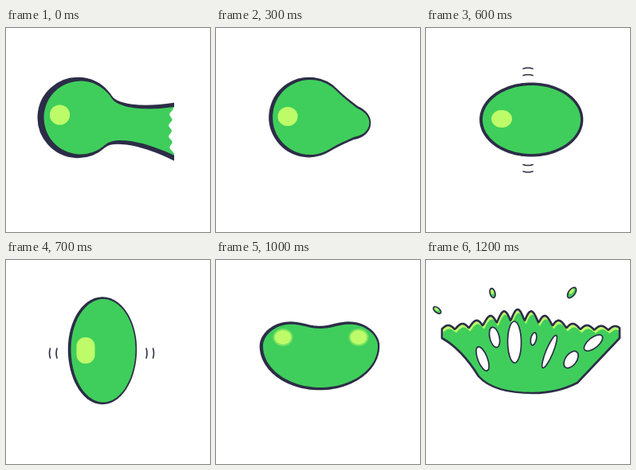
Animation of 256 by 256 pixels, one loop 1.3 s. Source, as an HTML page with a canvas:

```html
<!DOCTYPE html>
<html lang="en">
<head>
<meta charset="utf-8">
<title>Slime bounce</title>
<style>
html, body { margin: 0; width: 100%; height: 100%; overflow: hidden; background: #fff; }
canvas { display: block; width: 256px; height: 256px; }
</style>
</head>
<body>
<canvas id="stage"></canvas>
<script>
const INK = '#2c2d47', GREEN = '#3fce5b', LIME = '#bdfb69', WHITE = '#fff';
const STEP = 100, TAU = Math.PI * 2;
const canvas = document.getElementById('stage');
const ctx = canvas.getContext('2d');
const ratio = window.devicePixelRatio || 1;
canvas.width = canvas.height = 256 * ratio;
ctx.scale(ratio, ratio);
ctx.lineCap = ctx.lineJoin = 'round';

function fill(path, color) {
  ctx.fillStyle = color;
  ctx.fill(path);
}

function line(path, width) {
  ctx.strokeStyle = INK;
  ctx.lineWidth = width;
  ctx.stroke(path);
}

function oval(x, y, rx, ry, turn = 0) {
  const path = new Path2D();
  path.ellipse(x, y, rx, ry, turn, 0, TAU);
  return path;
}

// Oval with separate upper and lower radii and a soft dent in its top
function bean(cx, cy, rx, up, down, dent = 0) {
  const path = new Path2D();
  for (let a = 0; a < TAU; a += TAU / 120) {
    const x = rx * Math.cos(a), s = Math.sin(a);
    const y = s > 0 ? s * down : s * up + dent * Math.exp(-((x / 35) ** 2)) * Math.min(1, -3 * s);
    path.lineTo(cx + x, cy + y);
  }
  path.closePath();
  return path;
}

// Ball drawn out along a tilted axis: waist and end are [distance, half width]
function drop(cx, cy, r, open, tilt, waist, end) {
  const half = new Path2D(), c = Math.cos(open), s = Math.sin(open);
  const [wx, wy] = waist, [ex, ey] = end, pull = 14, cap = ex + 1.25 * ey;
  half.arc(0, 0, r, open, TAU - open);
  half.bezierCurveTo(r * c + pull * s, -r * s + pull * c, wx, -wy, ex, -ey);
  half.bezierCurveTo(cap, -0.65 * ey, cap, 0.65 * ey, ex, ey);
  half.bezierCurveTo(wx, wy, r * c + pull * s, r * s - pull * c, r * c, r * s);
  const path = new Path2D();
  path.addPath(half, new DOMMatrix().translate(cx, cy).rotate(tilt * 360 / TAU));
  return path;
}

// Green body; shifting the ink makes the outline heavier on the left
function body(path, ink, shift) {
  ctx.save();
  ctx.translate(-shift, 0);
  fill(path, INK);
  line(path, ink * 2);
  ctx.restore();
  fill(path, GREEN);
}

function shine(...args) { fill(oval(...args), LIME); }

function softShine(x, y) {
  ctx.globalAlpha = 0.45;
  shine(x, y, 12.5, 11);
  ctx.globalAlpha = 1;
  shine(x, y, 10.5, 9);
}

// Two short strokes on either side, along the given direction
function marks(cx, cy, turn) {
  ctx.save();
  ctx.translate(cx, cy);
  ctx.rotate(turn);
  for (const d of [-64.5, -56, 56, 64.5]) {
    const path = new Path2D();
    path.moveTo(-6, d);
    path.quadraticCurveTo(0, d + 2 * Math.sign(d), 6, d);
    line(path, 1.6);
  }
  ctx.restore();
}

function torn() {
  ctx.save();
  ctx.beginPath();
  ctx.rect(0, 0, 211, 256);
  ctx.clip();
  body(drop(93.5, 112.5, 46, 0.7, 0.133, [76, 16], [128, 33]), 4.7, 3.3);
  const tear = new Path2D('M230 160V100');
  for (let y = 100; y <= 157; y++) tear.lineTo(208 + 2 * Math.sin(y * 0.45) - 2 * Math.sin((y - 100) / 18), y);
  fill(tear, WHITE);
  ctx.restore();
  shine(67.5, 109, 12.6, 12.6);
}

function tail() {
  body(drop(101, 112, 46, 0.7, 0.1, [82, 12], [117, 7]), 3.8, 2);
  shine(76, 109, 12.5, 12.5);
}

function pear() {
  body(drop(111, 110, 47.5, 0.8, 0.155, [65, 20], [80, 14]), 3.1, 1.8);
  shine(85, 109, 12.3, 12.3);
}

function egg() {
  body(drop(118, 112, 47, 0.9, 0.12, [50, 23], [58, 18]), 3.3, 1.4);
  shine(90, 111, 12.5, 12);
}

function wide() {
  body(bean(132.5, 115, 61.5, 43, 43), 3.6, 0.3);
  shine(95, 114, 13, 11);
  marks(128, 115.5, 0);
}

function tall() {
  body(bean(122, 112, 40.5, 63, 66.5), 2.7, 1);
  const glow = new Path2D();
  glow.roundRect(88.5, 97, 23, 33, 11);
  fill(glow, LIME);
  marks(120, 117, TAU / 4);
}

function dented() {
  body(bean(131, 108, 72, 38, 52, 16), 3.3, 1);
  softShine(84, 97);
  softShine(179, 97);
}

function bent() {
  body(bean(130.2, 105, 83, 43, 57, 35), 3.6, 1);
  softShine(73.5, 88);
  softShine(186.5, 87);
}

function splash() {
  const lean = x => (x - 112) / 110;
  const bowl = new Path2D('M243 98L190 154Q165 167 134 167Q85 167 66 146Q45 112 20 98');
  for (let x = 20; x <= 243; x++) {
    const hump = Math.exp(-(((x - 115) / 50) ** 2));
    const wave = Math.abs(Math.cos((x - 115) * Math.PI / 17.5));
    bowl.lineTo(x, 88 - 12 * hump - (5 + 9 * hump) * wave);
  }
  bowl.closePath();
  fill(bowl, LIME);
  ctx.save();
  ctx.clip(bowl);
  ctx.translate(1.5, 4.5);
  fill(bowl, GREEN);
  ctx.restore();
  line(bowl, 2.6);

  const holes = [[71, 124, 6, 16], [86, 97, 6, 13], [111, 103, 8.5, 26], [135, 99, 3.5, 8],
    [155, 115, 4.5, 22], [182, 125, 7, 12], [210, 104, 6.5, 14]];
  for (const [x, y, rx, ry] of holes) {
    const hole = oval(x, y, rx, ry, lean(x));
    fill(hole, WHITE);
    line(hole, 1.7);
  }
  for (const [x, y, r] of [[14, 63, 3], [83.5, 41.5, 3.2], [183, 41, 4]]) {
    const bead = oval(x, y, r, r * 1.9, lean(x));
    fill(bead, GREEN);
    shine(x - 0.5, y - r / 2, r * 0.6, r, lean(x));
    line(bead, 1.7);
  }
}

const poses = [torn, tail, pear, egg, wide, tall, wide, tall, wide, tall, dented, bent, splash];

function frame() {
  const step = Math.floor(performance.now() / STEP) % poses.length;
  ctx.fillStyle = WHITE;
  ctx.fillRect(0, 0, 256, 256);
  poses[step]();
  requestAnimationFrame(frame);
}
frame();
</script>
</body>
</html>
```
